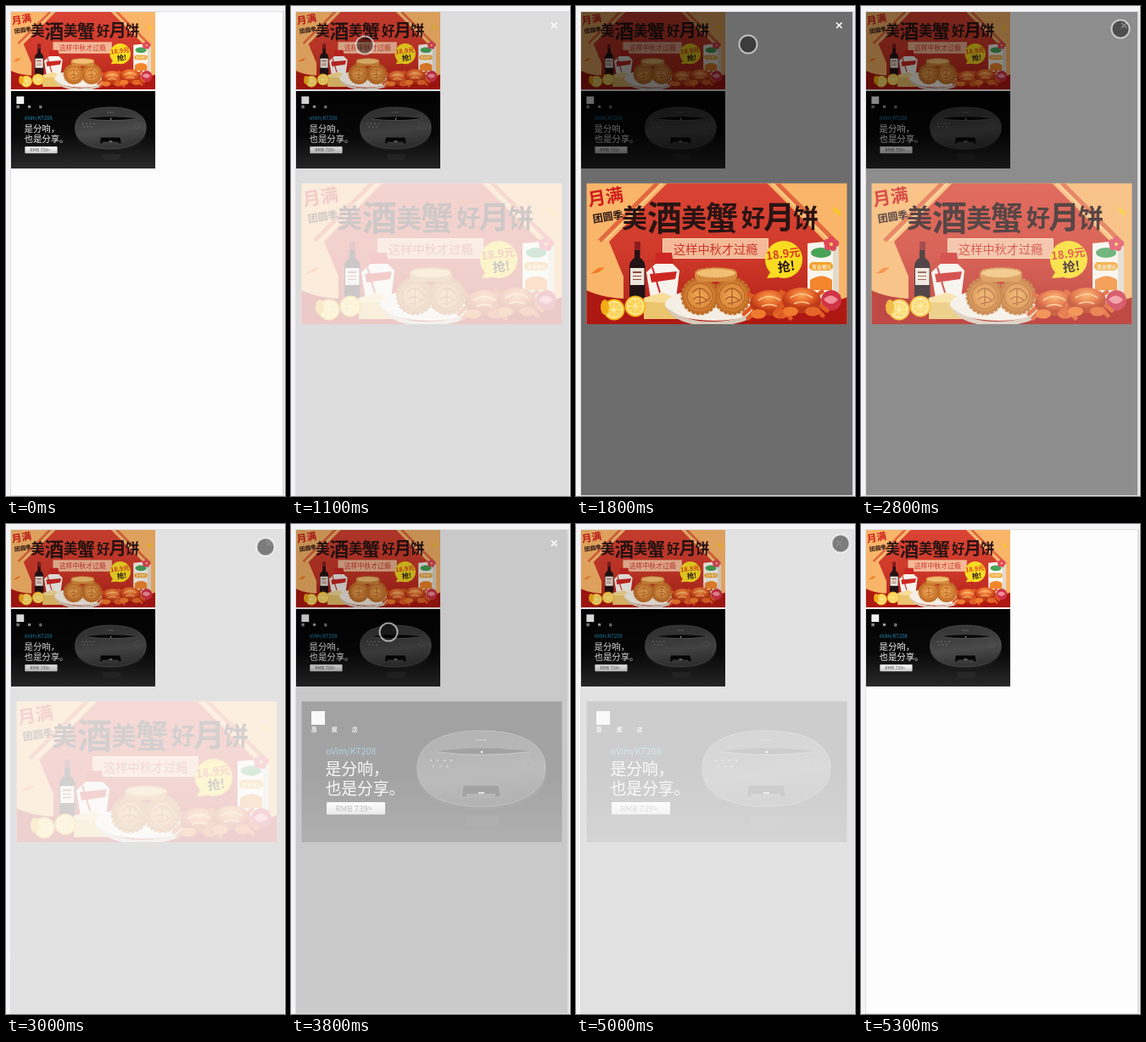
Write an HTML page that moves like this. It is 329 px wide and 576 px high and loops after 5.4 s.

```html
<!DOCTYPE html>
<html lang="zh">
<head>
<meta charset="utf-8">
<title>Banner preview</title>
<style>
html, body { margin: 0; width: 100%; height: 100%; overflow: hidden; background: #f4f4f6; }
svg { display: block; width: 100%; height: 100%; }
text { font-family: "Noto Sans CJK SC", "Noto Sans CJK", "Noto Sans", sans-serif; }
.heavy { font-weight: 900; }
</style>
</head>
<body>
<svg viewBox="0 0 329 576">
<defs>
  <clipPath id="frame"><rect x="12.5" y="208.5" width="307" height="165.5"/></clipPath>
  <linearGradient id="wall" x2="0" y2="1">
    <stop offset="0" stop-color="#da4434"/><stop offset=".5" stop-color="#cf3a2a"/>
    <stop offset="1" stop-color="#ae1c14"/>
  </linearGradient>
  <linearGradient id="floor" x2="0" y2="1">
    <stop offset="0" stop-color="#030303"/><stop offset=".55" stop-color="#080808"/>
    <stop offset=".8" stop-color="#1b1b1b"/><stop offset="1" stop-color="#2b2b2b"/>
  </linearGradient>
  <linearGradient id="shell" x2=".2" y2="1">
    <stop offset="0" stop-color="#343434"/><stop offset=".3" stop-color="#3a3a3a"/>
    <stop offset=".65" stop-color="#4a4a4a"/><stop offset="1" stop-color="#343434"/>
  </linearGradient>
  <linearGradient id="pill" x2="0" y2="1">
    <stop offset="0" stop-color="#fff"/><stop offset="1" stop-color="#c9c9c9"/>
  </linearGradient>
  <radialGradient id="crust">
    <stop offset="0" stop-color="#f0ab58"/><stop offset=".7" stop-color="#dc8a3a"/>
    <stop offset="1" stop-color="#b5621f"/>
  </radialGradient>
  <radialGradient id="shellfish" cy=".3">
    <stop offset="0" stop-color="#f9a650"/><stop offset=".6" stop-color="#e5632a"/>
    <stop offset="1" stop-color="#bd3916"/>
  </radialGradient>

  <g id="cake">
    <circle r="21" fill="url(#crust)" stroke="#c0702a" stroke-width="3" stroke-dasharray="4 1.5"/>
    <circle r="15" fill="none" stroke="#b9692a" stroke-width="1.4"/>
    <path d="M-9-4Q0-14 9-4T-5 9M-8 4Q0-3 8 5M0-10V11" fill="none" stroke="#b0602a" stroke-width="1.4"/>
  </g>
  <g id="crab">
    <path d="M-20 4L-30 13M-17 9L-25 18M20 4L30 12M17 9L25 18M-15-4L-24-10M15-4L24-10"
      stroke="#dd5a24" stroke-width="5" stroke-linecap="round"/>
    <ellipse rx="23" ry="15" fill="url(#shellfish)"/>
    <path d="M-13-3Q0-12 13-3M-9 4Q0 0 9 4" fill="none" stroke="#ffc98a" stroke-width="1.6"/>
    <ellipse cx="-13" cy="13" rx="9" ry="5.5" fill="#ef7a2e"/>
    <ellipse cx="13" cy="13" rx="9" ry="5.5" fill="#e5652a"/>
  </g>
  <g id="lemon">
    <circle r="12.5" fill="#f5b81c"/>
    <circle r="10.5" fill="#ffe99a"/>
    <circle r="8.8" fill="#fbd050"/>
    <path d="M-9 0H9M0-9V9M-6-6L6 6M6-6L-6 6" stroke="#fff0b0"/>
  </g>

  <g id="feast" clip-path="url(#frame)">
    <path fill="#f9b569" d="M12 208h308v167H12z"/>
    <path fill="none" stroke="#e2683f" stroke-width="5" d="M96 208L28 276M237 208L306 277"/>
    <path fill="none" stroke="#fbdfae" stroke-width="1.4" stroke-dasharray="2 1" d="M102 208L34 276M231 208L300 277"/>
    <path fill="url(#wall)" d="M108 208H225L294 277 276 318V375H56V318L39 277z"/>
    <path fill="#ae1812" d="M12 334Q36 346 80 344T166 340 270 344 320 334V375H12z"/>
    <path fill="#f37b24" d="M17 315l9-7 8-1-7 6z"/>
    <path fill="#f9c822" d="M303 236l7 4 3 7-8-4z"/>

    <g class="heavy" transform="rotate(-9 36 238)">
      <text x="16" y="232" font-size="21" fill="#cf1d1b">月满</text>
      <text x="18" y="252" font-size="12" fill="#2a1413">团圆季</text>
    </g>
    <text class="heavy" fill="#2a1413" font-size="30">
      <tspan x="54" y="260">美</tspan><tspan x="84" y="264" font-size="41">酒</tspan><tspan
      x="124" y="260">美</tspan><tspan x="153" y="263" font-size="38">蟹</tspan><tspan
      x="195" y="260" font-size="28">好</tspan><tspan x="221" y="262" font-size="37">月</tspan><tspan
      x="256" y="260">饼</tspan>
    </text>
    <path fill="#f4b999" stroke="#f9d2ae" d="M102.500 273.500h124v23h-124z"/>
    <text x="115" y="290.500" font-size="14.200" font-weight="500" fill="#cc3427">这样中秋才过瘾</text>

    <path fill="#231316" d="M69 277h6.500v19q6 4 6 10v37H63v-37q0-6 6-10z"/>
    <path fill="#8c1c22" d="M69 277h6.500v10H69z"/>
    <path fill="#ece5da" d="M64 308h16.500v20H64z"/>
    <path fill="#8b4a3b" d="M67 312h10v2H67zM67 317h10v1H67zM67 321h10v1H67z"/>

    <path fill="#f7f2ec" d="M95 302h18l9 9-4 33H88l-5-31z"/>
    <path fill="#cc2723" d="M94 290h19l2 13H93zM87 315l32-3-2 9-28 4z"/>
    <path fill="none" stroke="#cc2723" stroke-width="2" d="M90 307l9 30"/>

    <path fill="#f7dc96" d="M80 343l22-6 20 8v23H80z"/>
    <path fill="#ebc46e" d="M80 348l42 1v19H80z"/>
    <use href="#lemon" x="70" y="353"/>
    <use href="#lemon" x="45" y="357"/>
    <ellipse cx="34" cy="354" rx="5" ry="9" fill="#f1ac18"/>

    <ellipse cx="163" cy="351" rx="58" ry="19" fill="#f5eee4"/>
    <path fill="#d7c8b9" d="M105 353Q128 372 163 371T221 353Q208 375 163 376T105 353z"/>
    <use href="#cake" x="184" y="341"/>
    <use href="#cake" x="146" y="341"/>
    <rect x="140" y="309" width="50" height="15" rx="7" fill="#d58a3e"/>
    <ellipse cx="165" cy="314" rx="24" ry="6" fill="#f2bf74" stroke="#d08a3c" stroke-width="2" stroke-dasharray="3 1"/>

    <path fill="#f8f5ed" d="M273 279l30-3 7 8v65l-37 2z"/>
    <path fill="#e2dacb" d="M303 276l7 8v65l-7 1z"/>
    <ellipse cx="289" cy="290" rx="12" ry="6" fill="#4ba35a"/>
    <rect x="275" y="301" width="28" height="10" rx="5" fill="#f0a32b"/>
    <text x="278" y="309" font-size="6" fill="#fff">黄金蟹礼</text>
    <path fill="#f2862d" d="M276 322q14-9 26 0v12h-26z"/>
    <g fill="#e0485a">
      <circle cx="301" cy="275" r="4"/><circle cx="306" cy="279" r="4"/><circle cx="303" cy="284" r="4"/>
      <circle cx="297" cy="283" r="4"/><circle cx="296" cy="278" r="4"/>
    </g>
    <circle cx="301" cy="280" r="2" fill="#fbd35b"/>
    <circle cx="301" cy="346" r="12" fill="#cf3346"/>
    <path fill="#f2909a" d="M292 345q8-9 17 0-8 10-17 0z"/>
    <use href="#crab" x="228" y="349"/>
    <use href="#crab" x="266" y="346"/>

    <path fill="#f9dc22" d="M229 313l-4 7 13-1z"/>
    <circle cx="245" cy="298" r="22" fill="#f9dc22"/>
    <g text-anchor="middle" font-weight="700" transform="rotate(-7 245 298)">
      <text x="245" y="296" font-size="13" fill="#dd3a20">18.9元</text>
      <text x="247" y="312" font-size="15" fill="#2a1413">抢!</text>
    </g>
  </g>

  <g id="speaker" clip-path="url(#frame)">
    <path fill="url(#floor)" d="M12 208h308v167H12z"/>
    <rect x="24" y="220" width="16" height="16" fill="#f2f2f2"/>
    <text x="24" y="244" font-size="6.500" font-weight="700" fill="#ddd" letter-spacing="17.500">旗舰店</text>
    <text x="41" y="271" font-size="10.500" fill="#2589b4">oVim/KT208</text>
    <text font-size="18.800" fill="#f0f0f0"><tspan x="40.500" y="295">是分响，</tspan><tspan x="40.500" y="317.500">也是分享。</tspan></text>
    <rect x="42" y="327" width="69" height="14.500" rx="1" fill="url(#pill)"/>
    <text x="52.500" y="338" font-size="9.500" font-weight="500" fill="#555">RMB 739&gt;</text>

    <path fill="#303030" opacity=".55" d="M206 343h40q0 13-8 13h-24q-8 0-8-13z"/>
    <path fill="#1c1c1c" d="M148 290C148 260 178 243 224 243S301 260 301 290 272 336 224 336 148 320 148 290z"/>
    <path fill="url(#shell)" stroke="#6c6c6c" stroke-width=".8"
      d="M149 286C149 258 178 243 224 243S300 258 300 286 271 332 224 332 149 316 149 286z"/>
    <path fill="#050505" d="M172 267Q224 260 281 267Q224 274 172 267z"/>
    <path fill="none" stroke="#777" stroke-width=".7" d="M172 268Q224 275 281 268"/>
    <circle cx="225" cy="268" r="1.300" fill="#eee"/>
    <path stroke="#858585" stroke-width="2.500" stroke-linecap="round" stroke-dasharray="0 8" d="M165 278h26M168 285h20"/>
    <circle cx="280" cy="283" r="6" fill="none" stroke="#5b5b5b"/>
    <path stroke="#6a6a6a" stroke-width="1.500" d="M217 254h14"/>
    <path fill="#060606" stroke="#5c5c5c" stroke-width=".8" d="M203 307h42l3 14H201z"/>
    <path fill="#3f3f3f" d="M207 317h34v4H207z"/>
    <path stroke="#aaa" stroke-width="2" d="M221 316h7"/>
  </g>
</defs>

<path fill="#f4f4f6" d="M0 0h329v576H0z"/>
<path fill="#dedee1" d="M5 6h323v570H5z"/>
<path fill="#fdfdfd" d="M6 7h320v568H6z"/>
<use href="#feast" transform="translate(-.92 -107.660) scale(.5537 .5499)"/>
<use href="#speaker" transform="translate(-.92 -14.660) scale(.5537 .5499)"/>
<g id="modal">
  <path fill="#000" fill-opacity=".57" d="M6 7h320v568H6z"/>
  <use id="photo"/>
  <path stroke="#fff" stroke-width="1.600" d="M307 19.500l6.500 6.500M313.500 19.500l-6.500 6.500"/>
</g>
<circle id="touch" r="10.500" fill="#000" fill-opacity=".45" stroke="#fff" stroke-opacity=".6" stroke-width="2"/>
</svg>
<script>
const LOOP = 5400, TICK = 100;
const [modal, photo, touch] = ["modal", "photo", "touch"].map(id => document.getElementById(id));

// Keys: time, value(s)
const fade = [
  [1000, 0], [1100, .22], [1200, .52], [1300, .78], [1400, .94], [1500, 1],
  [2700, 1], [2800, .78], [2900, .46], [3000, .19], [3100, .05], [3200, 0],
  [3700, 0], [3800, .36], [3900, .64], [4000, .86], [4100, 1],
  [4700, 1], [4800, .78], [4900, .46], [5000, .19], [5100, .05], [5200, 0]
];
const path = [
  [100, 232, 42], [200, 175, 44], [300, 110, 46], [400, 87, 46],
  [1700, 87, 46], [1800, 203, 45], [1900, 260, 39], [2000, 290, 32], [2200, 306, 27],
  [3000, 306, 27], [3100, 240, 62], [3200, 150, 112], [3300, 115, 127],
  [4100, 115, 127], [4200, 240, 75], [4300, 317, 36], [4400, 314, 27], [4500, 312, 23]
];

function track(keys, t) {
  const i = keys.findIndex(k => k[0] >= t);
  if (i < 1) return keys.at(i).slice(1);
  const a = keys[i - 1], b = keys[i], p = (t - a[0]) / (b[0] - a[0]);
  return a.slice(1).map((v, n) => v + (b[n + 1] - v) * p);
}

function draw(now) {
  const t = Math.floor(now % LOOP / TICK) * TICK;
  const [x, y] = track(path, t);
  modal.setAttribute("opacity", track(fade, t)[0]);
  photo.setAttribute("href", t < 3500 ? "#feast" : "#speaker");
  touch.setAttribute("cx", x);
  touch.setAttribute("cy", y);
  touch.setAttribute("visibility", t >= 100 && t < 5200 ? "visible" : "hidden");
}

const start = performance.now();
function loop() {
  draw(performance.now() - start);
  requestAnimationFrame(loop);
}
loop();
</script>
</body>
</html>
```
